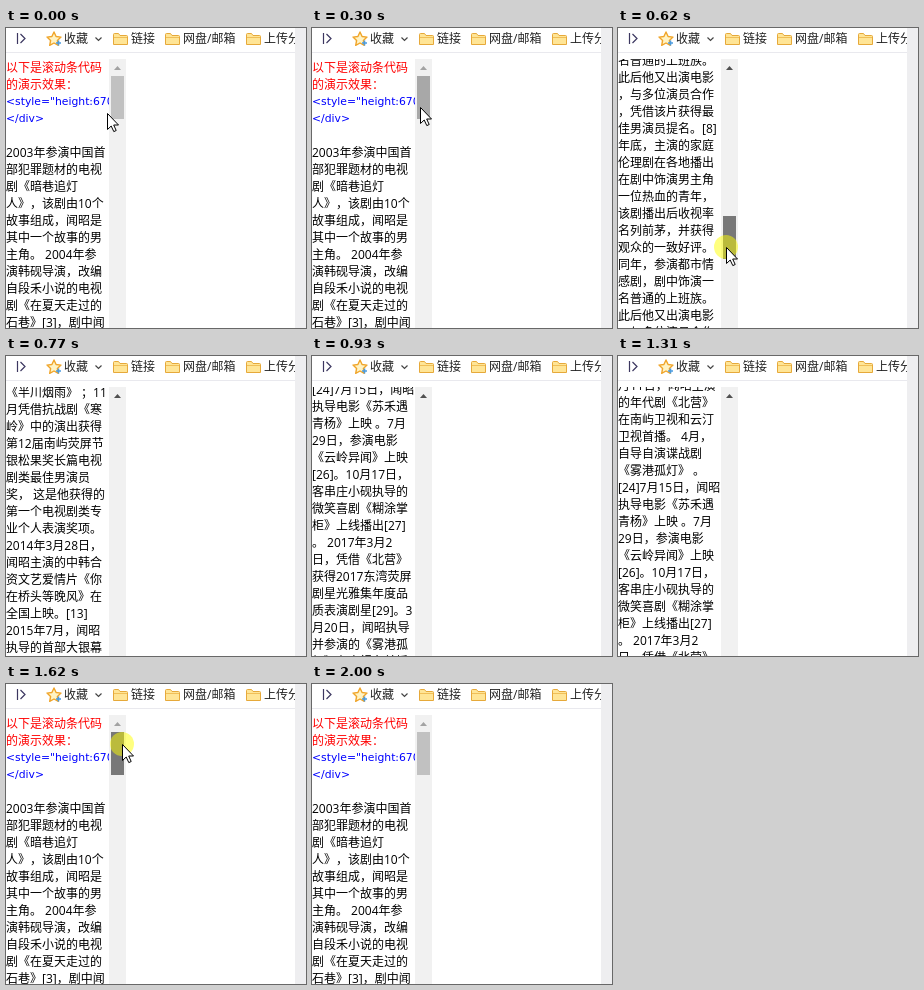
Write an HTML page that moves like this. It is 300 px wide and 300 px high and loops after 2320 ms.

```html
<!DOCTYPE html>
<html lang="zh-CN">
<head>
<meta charset="utf-8">
<title>滚动条演示</title>
<style>
@property --s { syntax: "<number>"; inherits: true; initial-value: 0; }
html, body { margin: 0; width: 100%; height: 100%; overflow: hidden; background: #fff; }
#stage {
  position: relative; width: 300px; height: 300px; overflow: hidden; background: #fff;
  font: 12px/17px "Open Sans", "Noto Sans CJK SC", "Noto Sans CJK", sans-serif;
  text-spacing-trim: space-all;
  animation: scroll 2320ms step-end infinite;
}
#stage > * { position: absolute; }
#bar { left: 0; top: 0; width: 300px; height: 24px; border-bottom: 1px solid #e9e9ee; color: #222; }
#bar span { position: absolute; top: 2px; white-space: nowrap; }
#bar svg { position: absolute; left: 0; top: 0; }
#edge { left: 289px; top: 0; width: 11px; height: 300px; background: #eeeef0; }
#view { left: 0; top: 31px; width: 103px; height: 269px; overflow: hidden; }
#text { transform: translateY(calc(var(--s) * -1px)); }
pre { margin: 0; font: inherit; color: #000; }
.red { color: #f00; }
.code { color: #00f; font: 10.8px/17px "DejaVu Sans", sans-serif; }
#track { left: 103px; top: 31px; width: 17px; height: 269px; background: #f1f1f1; overflow: hidden; }
#track * { position: absolute; }
#up {
  left: 5px; top: 7px; width: 7px; height: 4px; background: #a3a3a3;
  clip-path: polygon(50% 0, 100% 100%, 0 100%);
  animation: up 2320ms step-end infinite;
}
#thumb {
  left: 2px; top: 17px; width: 13px; height: 43px; background: #c1c1c1;
  transform: translateY(calc(round(var(--s) / 9.4, 1) * 1px));
  animation: thumb 2320ms step-end infinite;
}
#ring, #arrow { left: 0; top: 0; }
#ring {
  margin: -12px; width: 24px; height: 24px; border-radius: 50%; background: #ff0;
  animation: move 2320ms step-end infinite, press 2320ms step-end infinite;
}
#arrow { animation: move 2320ms step-end infinite, show 2320ms step-end infinite; }

@keyframes scroll {
  0% { --s: 0; }
  20.25% { --s: 85; }
  23.27% { --s: 178; }
  26.72% { --s: 1316; }
  33.18% { --s: 2383; }
  36.63% { --s: 2800; }
  40.08% { --s: 3100; }
  56.46% { --s: 3002; }
  59.91% { --s: 2450; }
  63.36% { --s: 1500; }
  66.37% { --s: 420; }
  69.82%, 100% { --s: 0; }
}
@keyframes move {
  0% { transform: translate(101px, 85px); }
  3.01% { transform: translate(103px, 83px); }
  6.46% { transform: translate(105px, 81px); }
  9.91% { transform: translate(107px, 80px); }
  12.93% { transform: translate(108px, 79px); }
  20.25% { transform: translate(108px, 88px); }
  23.27% { transform: translate(108px, 98px); }
  26.72% { transform: translate(108px, 219px); }
  33.18% { transform: translate(110px, 333px); }
  36.63% { transform: translate(110px, 377px); }
  40.08% { transform: translate(110px, 409px); }
  56.46% { transform: translate(110px, 398px); }
  59.91% { transform: translate(111px, 340px); }
  63.36% { transform: translate(113px, 239px); }
  66.37% { transform: translate(115px, 124px); }
  69.82% { transform: translate(116px, 60px); }
  73.27% { transform: translate(117px, 42px); }
  76.29% { transform: translate(117px, 30px); }
  79.74%, 100% { transform: translate(117px, 28px); }
}
@keyframes thumb {
  0% { background: #c1c1c1; }
  6.46% { background: #a8a8a8; }
  20.25% { background: #787878; }
  82.75%, 100% { background: #c1c1c1; }
}
@keyframes up {
  0% { background: #a3a3a3; }
  20.25% { background: #505050; }
  69.82%, 100% { background: #a3a3a3; }
}
@keyframes press {
  0% { opacity: 0; }
  20.25% { opacity: .5; }
  82.75%, 100% { opacity: 0; }
}
@keyframes show {
  0% { opacity: 1; }
  86.2%, 100% { opacity: 0; }
}
</style>
</head>
<body>
<div id="stage">
  <div id="bar">
    <svg width="300" height="24" fill="none">
      <defs>
        <g id="folder">
          <path d="M.5 11.5V1.5Q.5.5 1.5.5H5.5L7 2.5H13.5Q14.5 2.5 14.5 3.5V11.5Z" fill="#ffe596" stroke="#e6a93a"/>
          <path d="M1 4.5H14" stroke="#f0bf58"/>
        </g>
      </defs>
      <path d="M11.5 5V16M14.5 6L19 10.5L14.5 15" stroke="#3c3760" stroke-width="1.2"/>
      <path d="M48 4L50.1 8.5L55 9.1L51.4 12.5L52.3 17.3L48 15L43.7 17.3L44.6 12.5L41 9.1L45.9 8.5Z" fill="#fff3c4" stroke="#f0a52a" stroke-width="1.4" stroke-linejoin="round"/>
      <path d="M52.5 12.5V17.5M50 15H55" stroke="#4a9be0" stroke-width="1.6"/>
      <path d="M89.5 9.5L92.5 12.5L95.5 9.5" stroke="#444" stroke-width="1.2"/>
      <use href="#folder" x="107" y="5"/>
      <use href="#folder" x="159" y="5"/>
      <use href="#folder" x="240" y="5"/>
    </svg>
    <span style="left:58px">收藏</span>
    <span style="left:125px">链接</span>
    <span style="left:177px">网盘/邮箱</span>
    <span style="left:258px">上传分</span>
  </div>
  <div id="edge"></div>
  <div id="view">
    <div id="text">
      <pre class="red">以下是滚动条代码
的演示效果：</pre>
      <pre class="code">&lt;style="height:670px"&gt;
&lt;/div&gt;</pre>
      <pre id="story"></pre>
    </div>
  </div>
  <div id="track"><div id="up"></div><div id="thumb"></div></div>
  <div id="ring"></div>
  <svg id="arrow" width="14" height="21" style="overflow:visible">
    <path d="M.5.5V16.5L4.2 13L6.8 18.6L9.2 17.5L6.7 12H11.5Z" fill="#fff" stroke="#000"/>
  </svg>
</div>
<script>
const early = `
2003年参演中国首
部犯罪题材的电视
剧《暗巷追灯
人》，该剧由10个
故事组成，闻昭是
其中一个故事的男
主角。 2004年参
演韩砚导演，改编
自段禾小说的电视
剧《在夏天走过的
石巷》[3]，剧中闻
昭饰演方远一角，
开始在影视圈崭露
头角。[4] 2005年
拍摄第一部古装剧
《青衫吏》，该剧
由孟柏导演。2006
年自中央戏剧学院
毕业；与栾一川、
简若禾等人合作，
出演贺远舟执导的
电视剧《远灯》，`;

const middle = `《半川烟雨》 ；11
月凭借抗战剧《寒
岭》中的演出获得
第12届南屿荧屏节
银松果奖长篇电视
剧类最佳男演员
奖， 这是他获得的
第一个电视剧类专
业个人表演奖项。
2014年3月28日，
闻昭主演的中韩合
资文艺爱情片《你
在桥头等晚风》在
全国上映。[13]
2015年7月，闻昭
执导的首部大银幕`;

const late = `月11日，闻昭主演
的年代剧《北营》
在南屿卫视和云汀
卫视首播。 4月，
自导自演谍战剧
《雾港孤灯》 。
[24]7月15日，闻昭
执导电影《苏禾遇
青杨》上映 。7月
29日，参演电影
《云岭异闻》上映
[26]。10月17日，
客串庄小砚执导的
微笑喜剧《糊涂掌
柜》上线播出[27]
。 2017年3月2
日，凭借《北营》
获得2017东湾荧屏
剧星光雅集年度品
质表演剧星[29]。3
月20日，闻昭执导
并参演的《雾港孤
灯》在电视台首播`;

const filler = `在剧中饰演男主角
一位热血的青年，
该剧播出后收视率
名列前茅，并获得
观众的一致好评。
同年，参演都市情
感剧，剧中饰演一
名普通的上班族。
此后他又出演电影
，与多位演员合作
，凭借该片获得最
佳男演员提名。[8]
年底，主演的家庭
伦理剧在各地播出`.split("\n");

const lines = Array.from({ length: 200 }, (_, i) => filler[i % filler.length]);
const put = (row, text) => text.split("\n").forEach((t, i) => lines[row + i] = t);
put(4, early);
put(140, middle);
put(176, late);
// A leading newline set by script is kept, so row 4 stays blank.
document.getElementById("story").textContent = lines.slice(4).join("\n");
</script>
</body>
</html>
```
